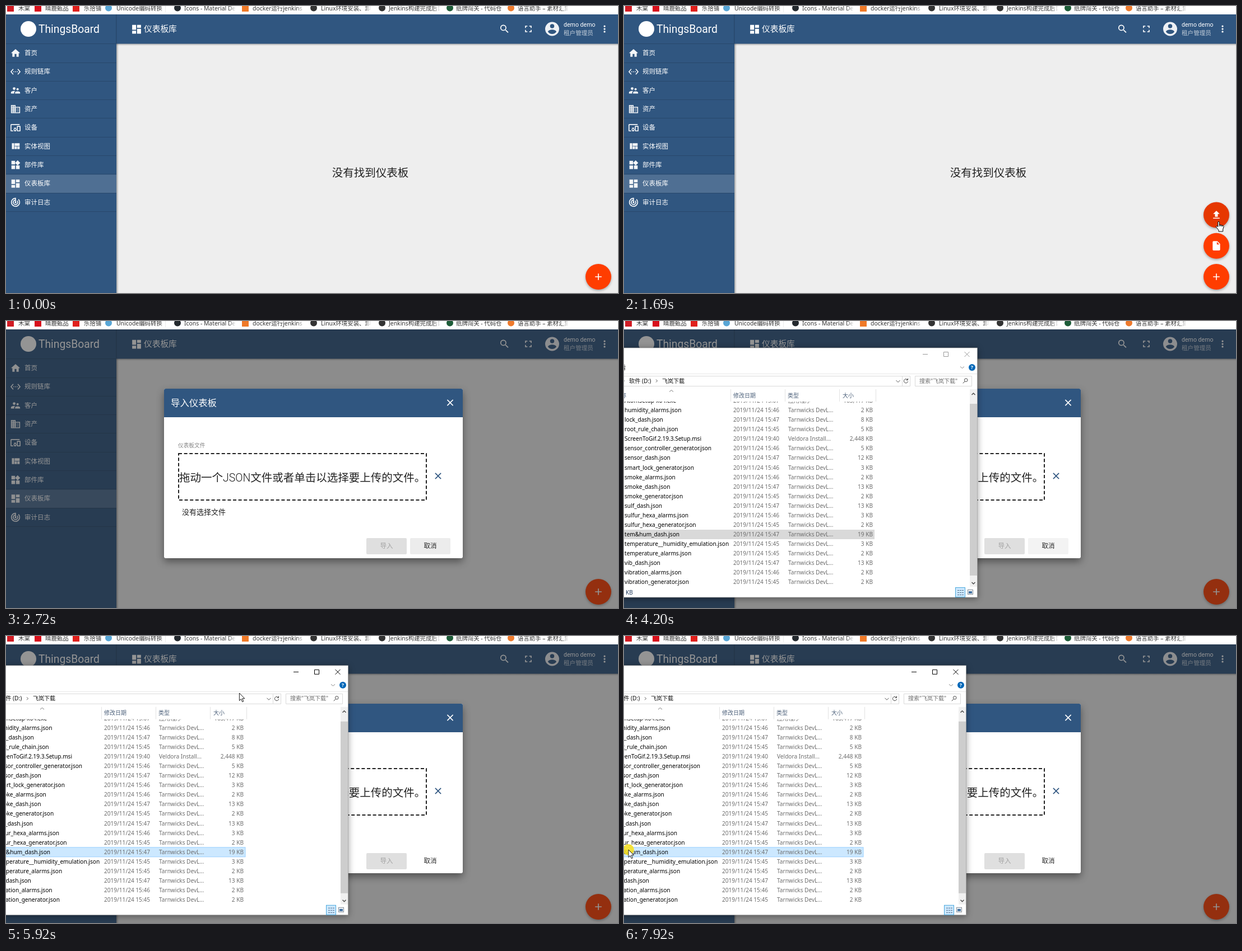
Recreate the animation shown at these times as an HTML page. Size 1092 px wide and 513 px high, loop 8 s.

```html
<!DOCTYPE html>
<html lang="zh-CN">
<head>
<meta charset="utf-8">
<title>导入仪表板</title>
<style>
html, body { margin: 0; width: 100%; height: 100%; overflow: hidden; background: #eee; }
svg { display: block; width: 1092px; height: 513px; }
text { font-family: Roboto, "Noto Sans CJK SC", sans-serif; white-space: pre; }
.win text, .tip text, .marks text { font-family: "Noto Sans", "Noto Sans CJK SC", sans-serif; }
.light { font-weight: 300; }
.fab { filter: drop-shadow(0 2px 2px rgba(0,0,0,.3)); }
.sheet { filter: drop-shadow(0 6px 7px rgba(0,0,0,.42)); }
.frame { filter: drop-shadow(0 2px 6px rgba(0,0,0,.4)); }
.line { fill: none; stroke-width: 1; }
</style>
</head>
<body>
<svg id="stage" viewBox="0 0 1092 513"></svg>
<script>
const ICONS = {
  home: 'M10 20v-6h4v6h5v-8h3L12 3 2 12h3v8z',
  rules: 'M7.77 6.76L6.23 5.48.82 12l5.41 6.52 1.54-1.28L3.42 12zM7 13h2v-2H7zM17 11h-2v2h2zM11 13h2v-2h-2zM17.77 5.48l-1.54 1.28L20.58 12l-4.35 5.24 1.54 1.28L23.18 12z',
  people: 'M16.5 12a2.5 2.5 0 1 0 0-5 2.5 2.5 0 0 0 0 5zM9 11a3 3 0 1 0 0-6 3 3 0 0 0 0 6zm7.5 3c-1.83 0-5.5.92-5.5 2.75V19h11v-2.25c0-1.83-3.67-2.75-5.5-2.75zM9 13c-2.33 0-7 1.17-7 3.5V19h7v-2.25c0-.85.33-2.34 2.37-3.47C10.5 13.1 9.66 13 9 13z',
  domain: 'M12 7V3H2v18h20V7zM6 19H4v-2h2zm0-4H4v-2h2zm0-4H4V9h2zm0-4H4V5h2zm4 12H8v-2h2zm0-4H8v-2h2zm0-4H8V9h2zm0-4H8V5h2zm10 12h-8v-2h2v-2h-2v-2h2v-2h-2V9h8zm-2-8h-2v2h2zm0 4h-2v2h2z',
  devices: 'M3 6h18V4H3c-1.1 0-2 .9-2 2v12c0 1.1.9 2 2 2h4v-2H3zm10 6H9v1.78a3 3 0 0 0 0 4.44V20h4v-1.78a3 3 0 0 0 0-4.44zm-2 5.5a1.5 1.5 0 1 1 0-3 1.5 1.5 0 0 1 0 3zM22 8h-6c-.5 0-1 .5-1 1v10c0 .5.5 1 1 1h6c.5 0 1-.5 1-1V9c0-.5-.5-1-1-1zm-1 10h-4v-8h4z',
  quilt: 'M10 18h5v-6h-5zM4 18h5V5H4zM16 18h5v-6h-5zM10 5v6h11V5z',
  widgets: 'M13 13v8h8v-8zM3 21h8v-8H3zM3 3v8h8V3zM16.66 1.69L11 7.34 16.66 13l5.66-5.66z',
  board: 'M3 13h8V3H3zM3 21h8v-6H3zM13 21h8V11h-8zM13 3v6h8V3z',
  track: 'M19.07 4.93l-1.41 1.41A8 8 0 1 1 11 4.07v2.02a6 6 0 1 0 5.24 1.67l-1.41 1.41A4 4 0 1 1 11 8.14v2.14a2 2 0 1 0 2 0V2h-1a10 10 0 1 0 7.07 2.93z',
  search: 'M15.5 14h-.79l-.28-.27a6.5 6.5 0 1 0-.7.7l.27.28v.79l5 4.99L20.49 19zm-6 0a4.5 4.5 0 1 1 0-9 4.5 4.5 0 0 1 0 9z',
  full: 'M7 14H5v5h5v-2H7zM5 10h2V7h3V5H5zM17 17h-3v2h5v-5h-2zM14 5v2h3v3h2V5z',
  account: 'M12 2a10 10 0 1 0 0 20 10 10 0 0 0 0-20zm0 3a3 3 0 1 1 0 6 3 3 0 0 1 0-6zm0 14.2a7.2 7.2 0 0 1-6-3.22c.03-1.99 4-3.08 6-3.08s5.97 1.09 6 3.08a7.2 7.2 0 0 1-6 3.22z',
  more: 'M12 8a2 2 0 1 0 0-4 2 2 0 0 0 0 4zm0 2a2 2 0 1 0 0 4 2 2 0 0 0 0-4zm0 6a2 2 0 1 0 0 4 2 2 0 0 0 0-4z',
  add: 'M19 13h-6v6h-2v-6H5v-2h6V5h2v6h6z',
  upload: 'M9 16h6v-6h4l-7-7-7 7h4zM5 18h14v2H5z',
  file: 'M6 2c-1.1 0-2 .9-2 2v16c0 1.1.9 2 2 2h12c1.1 0 2-.9 2-2V8l-6-6zm7 7V3.5L18.5 9z',
  close: 'M19 6.41L17.59 5 12 10.59 6.41 5 5 6.41 10.59 12 5 17.59 6.41 19 12 13.41 17.59 19 19 17.59 13.41 12z'
};

// Markup helpers; text and icons are placed by their vertical centre.
const text = (x, cy, size, str, fill = '#fff', more = '') =>
  `<text x="${x}" y="${cy + size * .36}" font-size="${size}" fill="${fill}" ${more}>${str.replace(/&/g, '&amp;')}</text>`;
const rect = (x, y, w, h, fill, more = '') =>
  `<rect x="${x}" y="${y}" width="${w}" height="${h}" fill="${fill}" ${more}/>`;
const disc = (x, y, r, fill, more = '') => `<circle cx="${x}" cy="${y}" r="${r}" fill="${fill}" ${more}/>`;
const line = (d, stroke, more = '') => `<path class="line" d="${d}" stroke="${stroke}" ${more}/>`;
const icon = (name, cx, cy, size, fill = '#fff') =>
  `<path d="${ICONS[name]}" fill="${fill}" transform="translate(${cx - size / 2} ${cy - size / 2}) scale(${size / 24})"/>`;
const END = 'text-anchor="end"', MID = 'text-anchor="middle"';

function bookmarks() {
  const items = [
    [8, 's', '#d01c24', 22, '木棠'], [57, 's', '#d8101c', 70, '晴鹿甄品'], [125, 's', '#e0201c', 139, '乐拾铺'],
    [183, 'c', '#58a6d6', 197, 'Unicode编码转换 | U', 287], [306, 'c', '#24292e', 318, 'Icons - Material De:', 411],
    [427, 's', '#f07a28', 440, 'docker运行jenkins -', 533], [549, 'c', '#333', 562, 'Linux环境安装、卸载', 653],
    [671, 'c', '#333', 683, 'Jenkins构建完成后目', 776], [792, 'c', '#1d5c38', 803, '纸牌闯关 - 代码仓'],
    [901, 'c', '#ee7a2c', 913, '语言助手 – 素材汇集', 1004]
  ];
  return rect(0, 0, 1092, 15, '#fff') + items.map(([ix, kind, color, x, str, end]) =>
    text(x, 4, 10.4, str, '#333') + (end ? rect(end - 14, 0, 24, 14, 'url(#fade)') : '') +
    (kind === 's' ? rect(ix - 6, -2, 12, 12, color) : disc(ix, 3.5, 6, color))).join('');
}

function sidebar() {
  const items = [['home', '首页'], ['rules', '规则链库'], ['people', '客户'], ['domain', '资产'], ['devices', '设备'],
    ['quilt', '实体视图'], ['widgets', '部件库'], ['board', '仪表板库'], ['track', '审计日志']];
  return rect(197, 67, 4, 446, 'url(#edge)') + rect(0, 15, 197, 498, '#305680') +
    rect(0, 67, 197, 1, '#28486c') +
    items.map(([name, label], i) => {
      const y = 67.5 + i * 33.33;
      return (i === 7 ? rect(0, y + .5, 197, 33, '#fff', 'opacity=".15"') : '') +
        rect(0, Math.round(y + 33), 197, 1, '#28486c') +
        icon(name, 17, y + 16.7, 19.5, '#f4f6f8') + text(33, y + 16.3, 11.5, label);
    }).join('');
}

function toolbar() {
  return rect(197, 67, 895, 4, 'url(#drop)') + rect(197, 15, 895, 52.5, '#305680') +
    rect(196, 15, 1.5, 52, '#28486c') +
    disc(40, 41, 14, '#fff') + text(58, 41, 19.3, 'ThingsBoard') +
    icon('board', 233, 41.5, 21) + text(246, 41, 14.7, '仪表板库') +
    icon('search', 889.5, 41, 20) + icon('full', 932, 41, 20) + icon('account', 974.5, 41, 30, '#eef1f5') +
    text(995, 33, 10.6, 'demo demo') + text(995, 48, 10.6, '租户管理员', '#fff', 'opacity=".7"') +
    icon('more', 1068, 41, 19.5);
}

const fab = (id, name) => `<g id="${id}">${disc(0, 0, 23, '#ff3d00', 'class="fab"')}${icon(name, 0, 0, 20)}</g>`;

function dialog() {
  const ink = '#212121';
  return `<g id="dialog">` + rect(282, 121, 533, 303, '#fff', 'rx="3" class="sheet"') +
    `<path d="M282 172V124q0-3 3-3H812q3 0 3 3V172z" fill="#305680"/>` +
    text(294, 146, 16.4, '导入仪表板') + icon('close', 792.5, 146, 19.5) +
    text(307, 223, 9.7, '仪表板文件', '#858585') +
    rect(308, 237, 442, 83, 'none', 'stroke="#222" stroke-width="2" stroke-dasharray="6 3.6"') +
    text(309, 279.5, 19.5, '拖动一个JSON文件或者单击以选择要上传的文件。', ink, 'class="light"') +
    icon('close', 771, 277, 19.5, '#305680') +
    text(314, 341, 13, '没有选择文件', ink) +
    rect(643, 388, 72, 29, '#dfdfdf', 'rx="2"') + text(679, 402, 11.5, '导入', '#a3a3a3', MID) +
    rect(721, 388, 72, 29, '#000', 'rx="2" id="cancel"') + text(757, 402, 11.5, '取消', '#262626', MID) + '</g>';
}

const PITCH = 17.05;
const FILES = `humidity_alarms|46|2 lock_dash|47|8 root_rule_chain|45|5 ScreenToGif.2.19.3.Setup.msi|40|2,448
sensor_controller_generator|46|5 sensor_dash|47|12 smart_lock_generator|46|3 smoke_alarms|46|2 smoke_dash|47|13
smoke_generator|45|2 sulf_dash|47|13 sulfur_hexa_alarms|46|3 sulfur_hexa_generator|45|2 tem&hum_dash|47|19
temperature__humidity_emulation|45|3 temperature_alarms|45|2 vib_dash|47|13 vibration_alarms|46|2
vibration_generator|45|2`.split(/\s+/).map(s => s.split('|'));

function fileRow(i, name, time, type, size) {
  const y = 159.6 + i * PITCH, gray = '#6d6d6d';
  return text(1, y, 10.1, name, '#000') + text(195, y, 10.1, '2019/11/24 ' + time, gray) +
    text(293, y, 10.1, type, gray) + text(444, y, 10.1, size + ' KB', gray, END);
}

function explorer() {
  const head = '#4c607a', rule = '#d9d9d9';
  const rows = fileRow(-1, 'AtomSetup-x64.exe', '15:07', '应用程序', '163,417') +
    FILES.map(([name, min, size], i) => {
      const msi = name.endsWith('msi');
      return fileRow(i, msi ? name : name + '.json', (msi ? '19:' : '15:') + min,
        msi ? 'Veldora Install...' : 'Tarnwicks DevL...', size);
    }).join('');
  return `<g id="win" class="win">` + rect(-300, 48, 930.5, 446, '#fff', 'class="frame" stroke="#8a8a8a" stroke-width=".6"') +
    `<g id="controls">` + line('M533 59.5h9M570.5 55.5h8v8h-8zM607.5 55l9 9m0-9l-9 9', 'currentColor') + '</g>' +
    text(-7, 83, 10.5, '看', '#333') + line('M600 81.5l3.5 3 3.5-3', '#888') +
    disc(621, 83, 6, '#0067b8') + text(621, 83, 9, '?', '#fff', MID + ' font-weight="700"') +
    line('M-40 94.5H630', '#e6e6e6') +
    line('M-40 98.5H510.5V116.5H-40M496.5 99V116M519.5 98.5H620.5V116.5H519.5z', rule) +
    line('M-2 104.5l2.5 2.5-2.5 2.5M57 104.5l2.5 2.5-2.5 2.5M485.5 106l3.5 3.5 3.5-3.5', '#555') +
    text(9, 107, 10.2, '软件 (D:)', '#111') + text(68, 107, 10, '飞岚下载', '#111') +
    line('M506 105.2a3.6 3.6 0 1 0 .6 2.6M506.5 102.5v3h-3', '#444') +
    text(527, 107, 10, '搜索"飞岚下载"', '#6d6d6d') +
    line('M613 105.6a2.8 2.8 0 1 1-5.6 0 2.8 2.8 0 1 1 5.6 0M608 108l-3.2 3.4', '#444') +
    line('M190.5 122V144M287.5 122V144M384.5 122V144M449.5 122V144', '#e2e2e2') +
    line('M81 126.5l3.5-3 3.5 3', '#777') +
    text(-6, 133, 10, '称', head) + text(195, 133, 10, '修改日期', head) +
    text(292, 133, 10, '类型', head) + text(390, 133, 10, '大小', head) +
    `<g clip-path="url(#list)">` + rect(-60, 0, 507, 17, '#e5f3ff', 'id="hover"') +
    rect(-60, 373, 507, 17, '#d9d9d9', 'id="selected"') + rows + '</g>' +
    rect(617, 122, 13, 353, '#f0f0f0') + rect(617, 148, 13, 307, '#cdcdcd') +
    line('M620.5 132l3-3 3 3M620.5 467l3 3 3-3', '#505050', 'style="stroke-width:1.5"') +
    text(3, 485, 10.1, 'KB', '#1e395b') +
    rect(591.5, 476.5, 17, 17, '#cce8ff', 'stroke="#4aa8dc"') +
    line('M595 481.5h3m1 0h3m1 0h3M595 485.5h3m1 0h3m1 0h3M595 489.5h3m1 0h3m1 0h3', '#4f6b85') +
    rect(613.5, 480.5, 9, 8, '#fff', 'stroke="#7d8791"') + rect(615, 483, 6, 4, '#3f6fa0') + '</g>';
}

function tip() {
  const lines = ['类型: Tarnwicks DevLooms', '大小: 2.00 KB', '修改日期: 2019/11/24 15:46'];
  return `<g id="tip" class="tip">` + rect(124, 364, 137, 44, '#000', 'opacity=".3"') +
    rect(121.5, 361.5, 137, 44, '#fff', 'stroke="#767676"') +
    lines.map((s, i) => text(126, 369.5 + i * 13.8, 10.1, s, '#575757')).join('') + '</g>';
}

const pointer = `<g id="cursor">${disc(0, 0, 10, '#f8e020', 'id="click" opacity=".88"')}
  <path id="arrow" d="M0 0V13.5L3.1 10.6 5.3 15.7 7.4 14.8 5.3 9.8H9.5z" fill="#fff" stroke="#000" stroke-width=".9"/>
  <path id="hand" d="M-1.3 1Q0-.8 1.3 1V6L8 7.6Q9.3 8 9 9.8L7.7 14V18H0V15.5L-4.6 9.8Q-4.4 7.8-2.6 8.6L-1.3 9.8zM1.3 6V9M3.8 6.8V9M6.2 7.4V9.6" fill="#fff" stroke="#000" stroke-width="1"/></g>`;

const gradient = (id, dir, color, a, b, mid) => `<linearGradient id="${id}" x2="${dir === 'x' ? 1 : 0}" y2="${dir === 'y' ? 1 : 0}">
  <stop stop-color="${color}" stop-opacity="${a}"/><stop offset="${mid}" stop-color="${color}" stop-opacity="${b}"/></linearGradient>`;

document.getElementById('stage').innerHTML =
  '<defs>' + gradient('fade', 'x', '#fff', 0, 1, .55) + gradient('edge', 'x', '#000', .3, 0, 1) +
  gradient('drop', 'y', '#000', .3, 0, 1) +
  '<clipPath id="list"><rect x="-60" y="144" width="677" height="332"/></clipPath></defs>' +
  rect(0, 0, 1092, 513, '#eee') +
  text(650, 298, 19.5, '没有找到仪表板', '#212121', MID + ' class="light"') +
  sidebar() + toolbar() + fab('import', 'upload') + fab('create', 'file') + fab('main', 'add') +
  rect(0, 15, 1092, 498, '#212121', 'id="shade"') +
  `<g class="marks">${bookmarks()}</g>` + dialog() + explorer() + tip() + pointer;

const el = {};
document.querySelectorAll('#stage g[id], #stage rect[id], #stage circle[id], #stage path[id]').forEach(n => el[n.id] = n);

// Bursts of change: first step, last step, number of steps.
const BURSTS = [[300, 550, 4], [690, 1470, 11], [1540, 1770, 4], [1930, 2720, 11], [4200, 4990, 11],
  [5070, 5450, 6], [5600, 5670, 2], [5830, 6550, 10], [6680, 7470, 11], [7540, 7920, 5]];
const STEPS = BURSTS.flatMap(([a, b, n]) =>
  Array.from({ length: n }, (_, k) => Math.floor((a + k * (b - a) / (n - 1)) / 10) * 10));

// Keys are [time, x, y].
const DRAG = [[5070, 0, 0], [5220, 0, 0], [5290, -1, 1], [5370, -4, 3], [5450, -11, 3], [5600, -15, 4], [5670, -20, 4.8]];
const PATHS = [
  [[300, 1086, 506], [550, 1066, 484], [690, 1066, 484], [1160, 1064, 446], [1470, 1062, 412], [1610, 1061, 388],
    [1690, 1061, 385], [2080, 1061, 385], [2560, 1030, 520]],
  [[4270, 742, 474], [4660, 600, 215], [4900, 484, 78], [5070, 478, 65]],
  [[5670, 458, 70], [5830, 458, 70], [5980, 380, 130], [6380, 130, 335], [6550, 108, 364], [6680, 108, 358],
    [6760, 102, 366], [7060, 55, 423], [7220, 28, 412], [7470, 8.5, 383], [7540, 8, 382], [8000, 8, 382]]
];

const clamp = v => Math.max(0, Math.min(1, v));
const ease = (t, a, b) => 1 - (1 - clamp((t - a) / (b - a))) ** 3;

function along(keys, t) {
  if (t <= keys[0][0]) return keys[0].slice(1);
  const i = keys.findIndex(k => k[0] >= t);
  if (i < 0) return keys[keys.length - 1].slice(1);
  const [t0, x0, y0] = keys[i - 1], [t1, x1, y1] = keys[i], p = (t - t0) / (t1 - t0);
  return [x0 + (x1 - x0) * p, y0 + (y1 - y0) * p];
}

function cursorAt(t, drag) {
  if (t >= 5070 && t <= 5670) return [478 + drag[0], 65 + drag[1]];
  const path = PATHS.find(k => t >= k[0][0] && t <= k[k.length - 1][0]);
  return path && along(path, t);
}

const show = (node, on) => node.setAttribute('visibility', on ? 'visible' : 'hidden');
const move = (node, x, y, scale = 1) => node.setAttribute('transform', `translate(${x} ${y}) scale(${scale})`);
const within = (t, a, b) => t >= a && t < b;

function draw(time) {
  const t = STEPS.reduce((last, s) => s <= time ? s : last, 0);
  const drag = along(DRAG, t), cur = cursorAt(t, drag);

  const open = ease(t, 620, 1200) * (1 - ease(t, 1860, 2300));
  [['main', 0], ['create', 55.3], ['import', 110.6]].forEach(([id, up]) => {
    const y = 484 - up * open;
    const over = cur && t < 2000 && Math.hypot(cur[0] - 1057, cur[1] - y) < 23;
    move(el[id], 1057, y);
    el[id].firstChild.setAttribute('fill', over ? '#e63700' : '#ff3d00');
    show(el[id], id === 'main' || open > .01);
  });

  el.shade.setAttribute('opacity', .48 * ease(t, 1860, 2500));
  const grow = ease(t, 2000, 2640), s = .087 + .913 * grow;
  move(el.dialog, 548.5 * (1 - s) + 508.5 * (1 - grow), 272.5 * (1 - s) + 100.5 * (1 - grow), s);
  el.dialog.setAttribute('opacity', clamp(grow * 1.3));
  show(el.dialog, grow > 0);
  el.cancel.setAttribute('opacity', t < 4200 ? .075 : .048 * (1 - clamp((t - 4200) / 320)));

  const active = t >= 5070;
  show(el.win, t >= 4200);
  move(el.win, ...drag);
  el.controls.setAttribute('color', active ? '#000' : '#999');
  el.selected.setAttribute('fill', active ? '#cce8ff' : '#d9d9d9');
  el.selected.setAttribute('stroke', active ? '#99d1ff' : 'none');
  const row = cur && t > 5830 ? Math.floor((cur[1] - drag[1] - 151.1) / PITCH) : -1;
  show(el.hover, row >= 0 && row !== 13);
  el.hover.setAttribute('y', 151.1 + row * PITCH);
  show(el.tip, within(t, 6550, 6750));

  show(el.cursor, cur);
  if (!cur) { ['click', 'arrow', 'hand'].forEach(id => show(el[id], false)); return; }
  move(el.cursor, ...cur);
  const hand = t < 2080;
  show(el.hand, hand);
  show(el.arrow, !hand);
  show(el.click, [[1770, 1930], [5070, 5830], [7540, 7630], [7730, 7820], [7920, 8000]].some(([a, b]) => within(t, a, b)));
}

const start = performance.now();
function tick() {
  draw((performance.now() - start) % 8000);
  requestAnimationFrame(tick);
}
tick();
</script>
</body>
</html>
```
